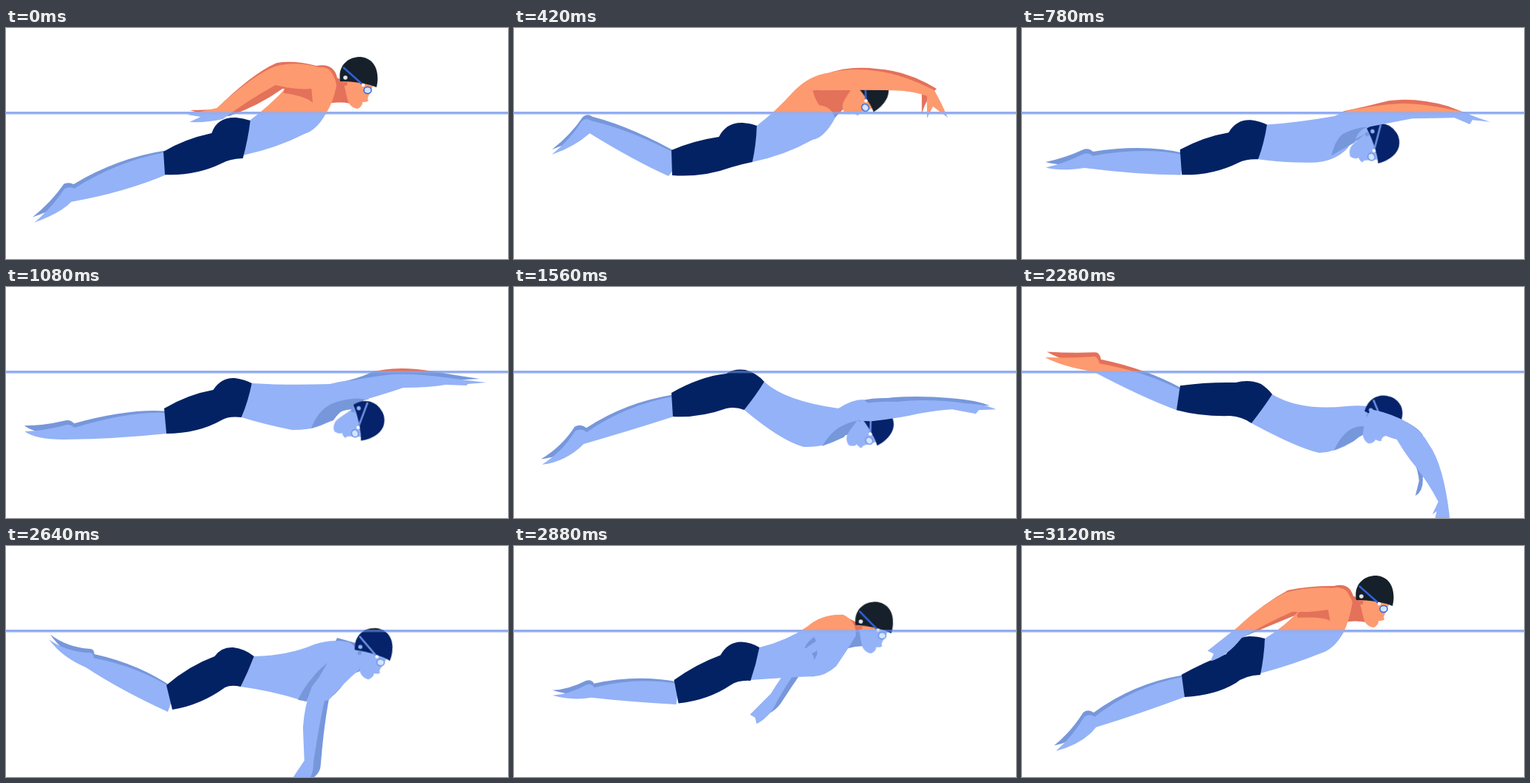
These frames come from a looping animation (676x312 px, 3.18 s). An HTML page without scripts:

```html
<!DOCTYPE html>
<html lang="en">
<head>
<meta charset="utf-8">
<title>Butterfly stroke</title>
<style>
html, body { margin: 0; width: 100%; height: 100%; overflow: hidden; background: #fff; }
svg { display: block; width: 100vw; height: 100vh; }

svg { --air-skin: #fd9a70; --air-shade: #e4715a; --wet-skin: #94b2f7; --wet-shade: #7797db; }
.air { --skin: var(--air-skin); --shade: var(--air-shade); --cap: #16202a; --strap: #2f62dc; --badge: #e3e7ec; }
.water { --skin: var(--wet-skin); --shade: var(--wet-shade); --cap: #05226a; --strap: #6d90e2; --badge: #94b2f7; }

/* body parts change colour at the waterline */
.skin { fill: url(#skin); }
.shade { fill: url(#shade); }
.suit { fill: #032264; }

.face { fill: var(--skin); }
.ear { fill: var(--shade); }
.cap { fill: var(--cap); }
.badge { fill: var(--badge); }
.strap { fill: none; stroke: var(--strap); stroke-width: 2.5; }
.lens { fill: #d3e6ff; stroke: var(--strap); stroke-width: 1.5; }

.move { animation: 3.18s linear infinite; }
.leg { animation-name: leg; }
.shorts { animation-name: shorts; }
.torso { animation-name: torso; }
.chest { animation-name: chest; }
.neck { animation-name: neck; }
.head { animation-name: head; }
.arm { animation-name: arm; }
.arm2 { animation-name: arm2; }
.back { fill: url(#back); }

@keyframes leg {
  0%, 100% { d: path("M214 168Q150 180 92 217Q86 214 79 217Q62 243 38 263Q74 250 88 235Q160 222 216 198Z"); }
  13.21% { d: path("M228 175Q160 138 104 125Q97 120 91 126Q76 150 51 171Q82 160 102 142Q160 178 208 200Z"); animation-timing-function: ease-out; }
  33.96% { d: path("M214 170Q165 168 92 190Q86 184 78 187Q52 194 25 195Q40 206 78 206Q150 205 216 198Z"); }
  49.06% { d: path("M213 148Q150 160 98 196Q90 190 82 195Q66 222 38 240Q70 236 94 212Q150 196 215 175Z"); }
  71.7% { d: path("M212 138Q165 114 104 103Q102 92 94 94Q65 96 31 95Q55 108 96 114Q160 148 208 166Z"); }
  83.02% { d: path("M228 195Q180 163 118 151Q118 143 110 144Q80 142 58 126Q75 150 108 164Q155 195 218 224Z"); }
  98.11% { d: path("M216 177Q150 190 98 231Q91 226 84 231Q68 258 46 277Q82 268 100 245Q160 226 219 204Z"); }
}
@keyframes shorts {
  0%, 100% { d: path("M212 167Q240 150 277 142Q284 120 310 121Q320 122 329 125Q326 150 319 176Q300 177 290 183Q255 200 214 198Z"); }
  13.21% { d: path("M212 165Q242 152 276 147Q286 127 308 128Q320 129 327 132Q326 158 321 181Q306 184 293 188Q255 202 213 199Z"); animation-timing-function: ease-out; }
  33.96% { d: path("M213 164Q245 145 279 139Q290 122 308 123Q322 125 331 130Q326 155 317 176Q300 174 290 180Q258 198 216 198Z"); }
  49.06% { d: path("M212 143Q250 121 286 117Q296 110 312 112Q328 117 337 128Q326 146 310 166Q298 161 286 164Q250 177 214 175Z"); }
  71.7% { d: path("M213 133Q250 128 288 129Q306 124 322 131Q332 138 337 145Q326 162 309 184Q296 175 280 174Q242 175 208 166Z"); }
  83.02% { d: path("M216 188Q246 162 281 149Q290 136 306 137Q322 139 334 149Q326 170 316 190Q303 187 295 191Q262 215 224 221Z"); }
  98.11% { d: path("M215 174Q245 157 275 146Q286 123 306 122Q318 122 327 125Q326 150 321 174Q300 175 288 185Q260 202 219 204Z"); }
}
@keyframes torso {
  0%, 100% { d: path("M328 125Q355 105 378 80Q395 58 425 55Q443 58 445 78Q441 100 430 117Q418 138 402 143Q365 162 319 172Z"); }
  13.21% { d: path("M327 132Q352 113 376 86Q396 64 425 60Q452 75 444 100Q438 112 432 122Q418 148 402 151Q365 172 321 181Z"); animation-timing-function: ease-out; }
  33.96% { d: path("M331 130Q380 133 437 131Q455 126 470 126Q490 140 485 152Q450 160 440 178Q420 194 385 193Q350 186 317 176Z"); }
  49.06% { d: path("M337 128Q365 154 437 164Q455 152 470 152Q490 165 485 178Q455 185 442 203Q420 217 390 216Q360 208 310 166Z"); }
  71.7% { d: path("M337 145Q375 168 437 161Q470 158 495 168Q515 185 505 200Q470 180 447 208Q425 223 400 224Q372 218 309 184Z"); }
  83.02% { d: path("M334 149Q380 148 415 133Q440 125 462 130Q485 145 475 168Q455 185 435 208Q415 215 396 208Q360 196 316 190Z"); }
  98.11% { d: path("M327 125Q355 108 376 84Q390 58 425 56Q440 60 445 76Q441 100 433 117Q420 140 402 145Q365 160 321 172Z"); }
}
@keyframes chest {
  0%, 100% { d: path("M413 101Q404 92 374 88Q372 82 380 80Q400 80 411 80Z"); }
  13.21% { d: path("M432 121Q428 106 411 104Q405 96 402 84Q440 82 468 84Z"); animation-timing-function: ease-out; }
  33.96% { d: path("M411 191Q420 166 440 157Q465 148 490 151Q455 158 441 180Z"); }
  49.06% { d: path("M415 215Q428 193 445 186Q465 177 488 178Q458 185 444 203Z"); }
  71.7% { d: path("M420 221Q434 190 456 188Q478 189 490 202Q466 190 447 208Z"); }
  83.02% { d: path("M393 208Q402 190 412 179Q420 168 433 158Q420 180 404 210Z"); }
  98.11% { d: path("M415 101Q405 95 371 97Q368 92 376 88Q400 87 412 85Z"); }
}
@keyframes neck {
  0%, 100% { d: path("M442 66L458 72L464 102Q448 99 432 102Z"); }
  13.21% { d: path("M440 86L468 84L462 106Q452 106 436 112Z"); animation-timing-function: ease-out; }
  33.96% { d: path("M450 140L485 150L470 165Q450 165 436 178Z"); }
  49.06% { d: path("M450 165L485 178L465 195Q455 200 445 200Z"); }
  71.7% { d: path("M455 175L490 170L480 195Q465 195 456 200Z"); }
  83.02% { d: path("M460 130L474 140L480 168Q475 170 465 174Z"); }
  98.11% { d: path("M442 66L458 72L464 103Q448 100 434 103Z"); }
}
@keyframes head {
  0%, 100% { transform: translate(475px, 60px) rotate(0deg); }
  13.21% { transform: translate(482px, 82px) rotate(46deg); animation-timing-function: ease-out; }
  33.96% { transform: translate(488px, 178px) rotate(69deg); }
  49.06% { transform: translate(489px, 183px) rotate(50deg); }
  71.7% { transform: translate(489px, 168px) rotate(26deg); }
  83.02% { transform: translate(496px, 132px) rotate(8deg); }
  98.11% { transform: translate(475px, 61px) rotate(0deg); }
}
@keyframes arm {
  0%, 100% { d: path("M440 84Q446 52 422 53Q390 44 362 52Q335 62 284 108L244 117L262 120L247 127Q272 128 292 123Q325 98 363 77Q390 84 412 82Z"); }
  6.3% { d: path("M446 74Q430 50 408 58Q395 72 402 92Q404 104 410 114L412 130L418 120L426 129Q428 112 432 104Q438 92 440 84Z"); }
  13.21% { d: path("M425 62Q402 70 412 84Q460 83 500 84Q535 84 556 92L556 122L564 106L584 121Q576 102 566 84Q525 63 490 58Q455 53 425 60Z"); animation-timing-function: ease-out; }
  33.96% { d: path("M440 140Q465 150 484 152Q515 143 535 136Q570 136 592 132L620 133L622 131L647 129Q620 126 598 123Q550 116 520 118Q480 122 437 133Z"); }
  49.06% { d: path("M440 172Q462 183 484 181Q520 177 545 171Q570 166 590 165L622 171L626 166L649 165Q635 158 608 157Q560 150 515 155Q475 153 437 165Z"); }
  71.7% { d: path("M462 180Q480 200 505 206Q518 228 530 242Q548 265 561 290L553 307L559 303L552 330Q578 330 576 308Q568 240 548 212Q530 178 470 165Z"); }
  83.02% { d: path("M444 156Q428 168 412 190Q402 215 400 245Q401 270 402 290L386 314L392 318L400 325Q415 312 414 294Q422 240 430 205Q440 190 448 165Z"); }
  98.11% { d: path("M441 82Q444 54 422 57Q385 54 355 63Q322 80 290 110L250 142L258 146L254 156Q276 150 296 124Q330 104 364 89Q390 90 412 86Z"); }
}
@keyframes arm2 {
  0%, 100% { d: path("M447 74Q445 46 418 51Q388 43 364 47Q330 62 282 110L247 111Q270 118 300 119Q340 105 372 82Q400 88 440 84Z"); }
  6.3% { d: path("M440 70Q430 48 405 55Q395 70 400 90Q402 104 406 114L414 128Q422 112 428 102Q436 92 440 84Q446 80 447 74Z"); }
  13.21% { d: path("M420 64Q445 75 470 72Q490 74 515 76Q540 80 549 88L549 116Q554 96 569 82Q530 58 490 55Q450 50 420 62Z"); animation-timing-function: ease-out; }
  33.96% { d: path("M440 140Q465 140 490 130Q515 128 535 128Q570 130 600 126L638 124Q610 120 575 114Q530 106 495 114Q470 126 437 131Z"); }
  49.06% { d: path("M440 172Q460 170 490 165Q515 160 545 158Q575 158 605 160L641 160Q620 152 590 150Q540 146 500 150Q465 150 437 164Z"); }
  71.7% { d: path("M470 180Q490 195 505 195Q520 215 530 240Q534 250 535 262L530 282Q541 276 540 258Q545 220 540 200Q526 180 475 168Z"); }
  83.02% { d: path("M446 124Q425 160 418 195Q412 230 410 260Q408 280 406 300L398 322Q424 312 424 296Q428 245 435 207Q470 180 471 131Z"); }
  98.11% { d: path("M447 72Q443 48 420 54Q385 54 358 60Q325 78 295 106L262 142Q280 140 300 122Q340 105 370 93Q400 92 440 84Z"); }
}
</style>
</head>
<body>
<svg viewBox="0 0 676 312">
  <defs>
    <clipPath id="above"><rect width="676" height="113.5"/></clipPath>
    <clipPath id="below"><rect y="113.5" width="676" height="198.5"/></clipPath>
    <linearGradient id="skin" gradientUnits="userSpaceOnUse" x1="0" y1="0" x2="0" y2="227">
      <stop offset=".5" style="stop-color: var(--air-skin)"/>
      <stop offset=".5" style="stop-color: var(--wet-skin)"/>
    </linearGradient>
    <linearGradient id="shade" gradientUnits="userSpaceOnUse" x1="0" y1="0" x2="0" y2="227">
      <stop offset=".5" style="stop-color: var(--air-shade)"/>
      <stop offset=".5" style="stop-color: var(--wet-shade)"/>
    </linearGradient>
    <!-- undoes the far leg's tilt so its waterline stays level -->
    <linearGradient id="back" href="#shade" gradientTransform="rotate(-1.6 212 180) translate(0 2.5)"/>
    <g id="face">
      <path class="face" d="M-22 8L-18 24Q-15 38 -13 42Q-8 49 -1 49Q4 46 5 42L5 40Q12 40 13 38Q11 35 14 30L20 16Z"/>
      <path class="cap" d="M-25 12C-29 -12 -11 -22 3 -21C21 -19 29 -2 24 20Q4 12 -25 12Z"/>
      <ellipse class="ear" cx="-18" cy="15" rx="2.5" ry="3"/>
      <path class="strap" d="M-21 -7L6 17"/>
      <ellipse class="lens" cx="12" cy="24" rx="5" ry="4.5"/>
      <circle cx="6" cy="17" r="2.3" fill="#fff"/>
      <circle class="badge" cx="-18" cy="7" r="2.8"/>
    </g>
  </defs>
  <rect y="113" width="676" height="3.4" fill="#95b0f5"/>
  <path class="move arm2 shade"/>
  <g transform="translate(0 -2.5) rotate(1.6 212 180)"><path class="move leg back"/></g>
  <path class="move leg skin"/>
  <path class="move neck shade"/>
  <path class="move torso skin"/>
  <path class="move chest shade"/>
  <g class="air" clip-path="url(#above)"><g class="move head"><use href="#face"/></g></g>
  <g class="water" clip-path="url(#below)"><g class="move head"><use href="#face"/></g></g>
  <path class="move shorts suit"/>
  <path class="move arm skin"/>
  <rect y="113" width="676" height="3.4" fill="#8fabf2" opacity=".45"/>
</svg>
</body>
</html>
```
